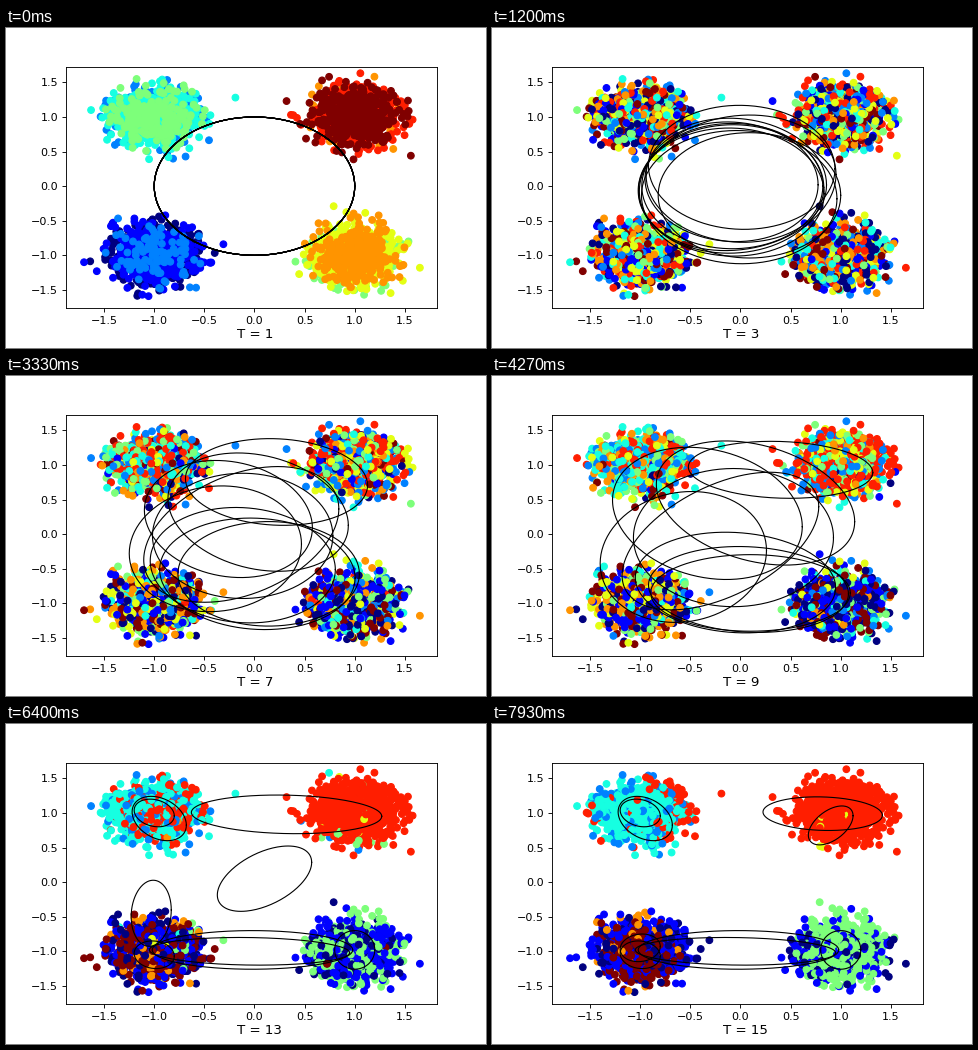
Recreate the animation shown at these times as a matplotlib script. Size 480 by 320 pixels, loop 8000 ms.

```python
import numpy as np
import matplotlib.pyplot as plt
from matplotlib.animation import FuncAnimation

STEPS, LOOP_MS = 15, 8000
PER_CLUSTER, SPREAD = 1000, .2
CENTERS = np.array([(-1, -1), (-1, 1), (1, -1), (1, 1)])
N = len(CENTERS) * PER_CLUSTER
FAR = [(-1.7, -1.1), (-.31, -.84), (-.19, 1.28), (-1.63, 1.1),
       (.79, -.29), (1.65, -1.18), (.32, 1.23), (1.56, .44)]

# Per component: mean at MID, mean at LATE, tilt, final share of the points
MID, LATE = 9, 13
PATHS = [
    ((.08, -.80), (-.05, -1.0), -.1, 1),
    ((.10, -.85), (-.02, -.98), 0, 1.5),
    ((.15, .45), (-.95, .92), -.3, .3),
    ((-.33, .30), (-1.0, 1.0), -.2, 1),
    ((-.07, -.05), (1.0, -.98), 0, 1),
    ((-.20, -.10), (.10, .05), .5, .05),
    ((-.57, -.33), (-1.03, -.45), .1, .08),
    ((.40, .93), (.32, .98), -.1, 2),
    ((-.05, -.70), (-1.0, -1.05), -.1, .5),
]
K = len(PATHS)
mid, late, tilts, shares = (np.array(col) for col in zip(*PATHS))
# The last components to settle; the rest rest after LATE
last = late.copy()
last[5], last[6], last[7] = (.90, .82), (-1.0, -.95), (.82, .99)

rng = np.random.default_rng(4)
sway = rng.normal(0, .06, (K, 2))
shrink = rng.uniform(0, .2, (K, 1))


def components(step):
    """Means, deviations, tilts and weights of all components."""
    early = np.clip((step - 1) / (MID - 1), 0, 1)
    split = np.clip((step - MID) / (LATE - MID), 0, 1)
    settle = np.clip((step - LATE) / (STEPS - LATE), 0, 1)
    bump = np.sin(np.pi * early)
    mean = mid * early ** 1.2 + sway * bump
    mean = mean + (late - mean) * split
    mean = mean + (last - mean) * settle
    weight = shares ** split
    # The nearer a mean is to a cluster, the less its component covers
    reach = np.sqrt(np.maximum(1 - (1 - SPREAD ** 2) * mean ** 2, 0))
    size = (1 - shrink * bump) * np.minimum(weight, 1)[:, None] ** .25
    return mean, np.maximum(SPREAD, reach * size), tilts * early, weight


def make_points():
    # Normal radii with the tail cut at about 3.3 deviations
    radius = SPREAD * np.sqrt(-2 * np.log(1 - rng.uniform(0, .996, N)))
    angle = rng.uniform(0, 2 * np.pi, N)
    pts = np.repeat(CENTERS, PER_CLUSTER, axis=0).astype(float)
    pts += np.column_stack([radius * np.cos(angle), radius * np.sin(angle)])
    for i, (x, y) in enumerate(FAR):
        cluster = 2 * (x > 0) + (y > 0)
        pts[int((cluster + .6) * PER_CLUSTER) + i] = x, y
    return pts


def sample_labels(step):
    """Draw each point's label from the components of the previous step."""
    if step == 1:
        return np.arange(N) * K // N
    mean, dev, rho, weight = components(step - 1)
    u, v = np.moveaxis((points[:, None] - mean) / dev, -1, 0)
    q = 1 - rho ** 2
    dist = (u * u - 2 * rho * u * v + v * v) / q
    dens = weight * np.exp(-dist / 2) / (dev.prod(axis=1) * np.sqrt(q))
    cum = np.cumsum(dens, axis=1)
    draw = np.random.default_rng(step).random((N, 1)) * cum[:, -1:]
    return np.minimum((cum < draw).sum(axis=1), K - 1)


points = make_points()
palette = plt.cm.jet(np.linspace(0, 1, K))
theta = np.linspace(0, 2 * np.pi, 181)

fig, ax = plt.subplots(figsize=(6, 4), dpi=80)
fig.subplots_adjust(left=.125, right=.8988, bottom=.125, top=.8793)
ax.set(xlim=(-1.88, 1.825), ylim=(-1.762, 1.728))
dots = ax.scatter(*points.T)
rings = [ax.plot([], [], color="black", lw=1)[0] for _ in range(K)]
caption = fig.text(231 / 480, 10 / 320, "", fontsize=12)


def update(i):
    step = i + 1
    colors = palette[sample_labels(step)]
    dots.set_facecolor(colors)
    dots.set_edgecolor(colors)
    mean, dev, tilt, _ = components(step)
    for ring, (mx, my), (sx, sy), rho in zip(rings, mean, dev, tilt):
        wave = rho * np.cos(theta) + np.sqrt(1 - rho ** 2) * np.sin(theta)
        ring.set_data(mx + sx * np.cos(theta), my + sy * wave)
    caption.set_text(f"T = {step}")
    return [dots, *rings, caption]


anim = FuncAnimation(fig, update, frames=STEPS, interval=LOOP_MS / STEPS,
                     repeat=True, repeat_delay=0, blit=False)
plt.show()
```
